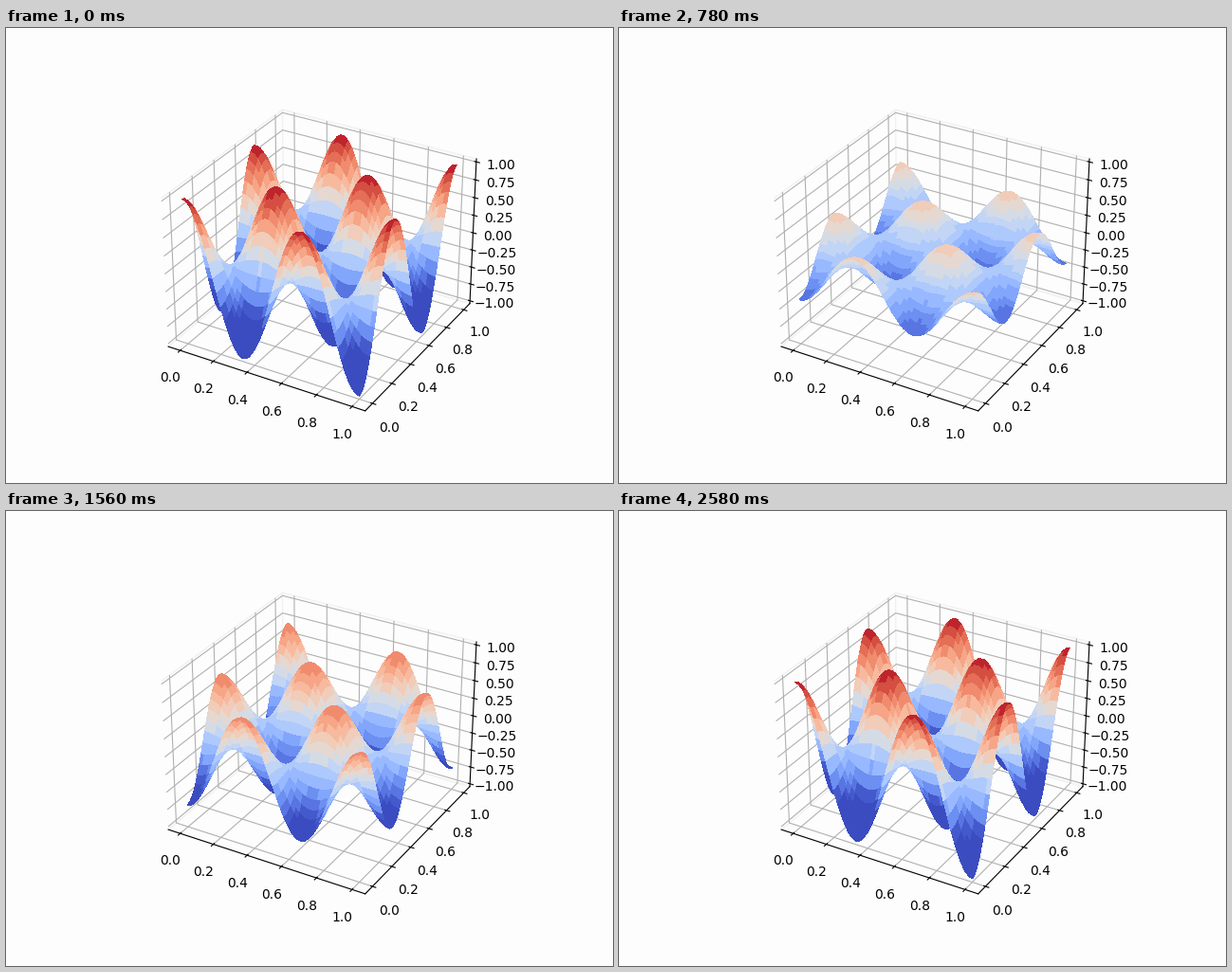
Recreate the animation shown at these times as a matplotlib script. Size 640 by 480 pixels, loop 2610 ms.

```python
import numpy as np
import matplotlib.pyplot as plt
from matplotlib.animation import FuncAnimation
from matplotlib.colors import ListedColormap

FRAMES, INTERVAL = 87, 30
OMEGA = 0.0736  # phase advance per frame
POINTS = 50
BANDS = 16
BACKGROUND = "#fdfdfd"

x, y = np.meshgrid(np.linspace(0, 1, POINTS), np.linspace(0, 1, POINTS))
mode = np.cos(3 * np.pi * x) * np.cos(3 * np.pi * y)


def height(frame):
    return mode * np.cos(OMEGA * (frame + 1))


def quads(z):
    p = np.stack([x, y, z], axis=-1)
    corners = [p[:-1, :-1], p[:-1, 1:], p[1:, 1:], p[1:, :-1]]
    return np.stack(corners, axis=2).reshape(-1, 4, 3)


def banded_coolwarm():
    base = plt.get_cmap("coolwarm")
    cmap = ListedColormap(base((np.arange(BANDS) + 0.5) / BANDS))
    cmap.set_under(base(0.0))
    return cmap


def padded(low, high):
    pad = (high - low) / 48
    return low - pad, high + pad


fig = plt.figure(figsize=(6.4, 4.8), dpi=100, facecolor=BACKGROUND)
ax = fig.add_subplot(projection="3d", facecolor=BACKGROUND)
ax.set_xlim(*padded(-0.05, 1.05))
ax.set_ylim(*padded(-0.05, 1.05))
ax.set_zlim(*padded(-1, 1))
ax.set_xticks(np.linspace(0, 1, 6))
ax.set_yticks(np.linspace(0, 1, 6))
ax.set_zticks(np.linspace(-1, 1, 9))

for axis in (ax.xaxis, ax.yaxis, ax.zaxis):
    axis.pane.set_alpha(None)
    axis.pane.set_facecolor("none")
    axis.pane.set_edgecolor("#f1f1f1")

surface = ax.plot_surface(x, y, height(0), cmap=banded_coolwarm(),
                          vmin=-0.5, vmax=1, linewidth=0, antialiased=False)


def update(frame):
    faces = quads(height(frame))
    surface.set_verts(faces)
    surface.set_array(faces[:, :, 2].mean(axis=1))
    return (surface,)


anim = FuncAnimation(fig, update, frames=FRAMES, interval=INTERVAL,
                     repeat=True, repeat_delay=0, blit=False)
plt.show()
```
